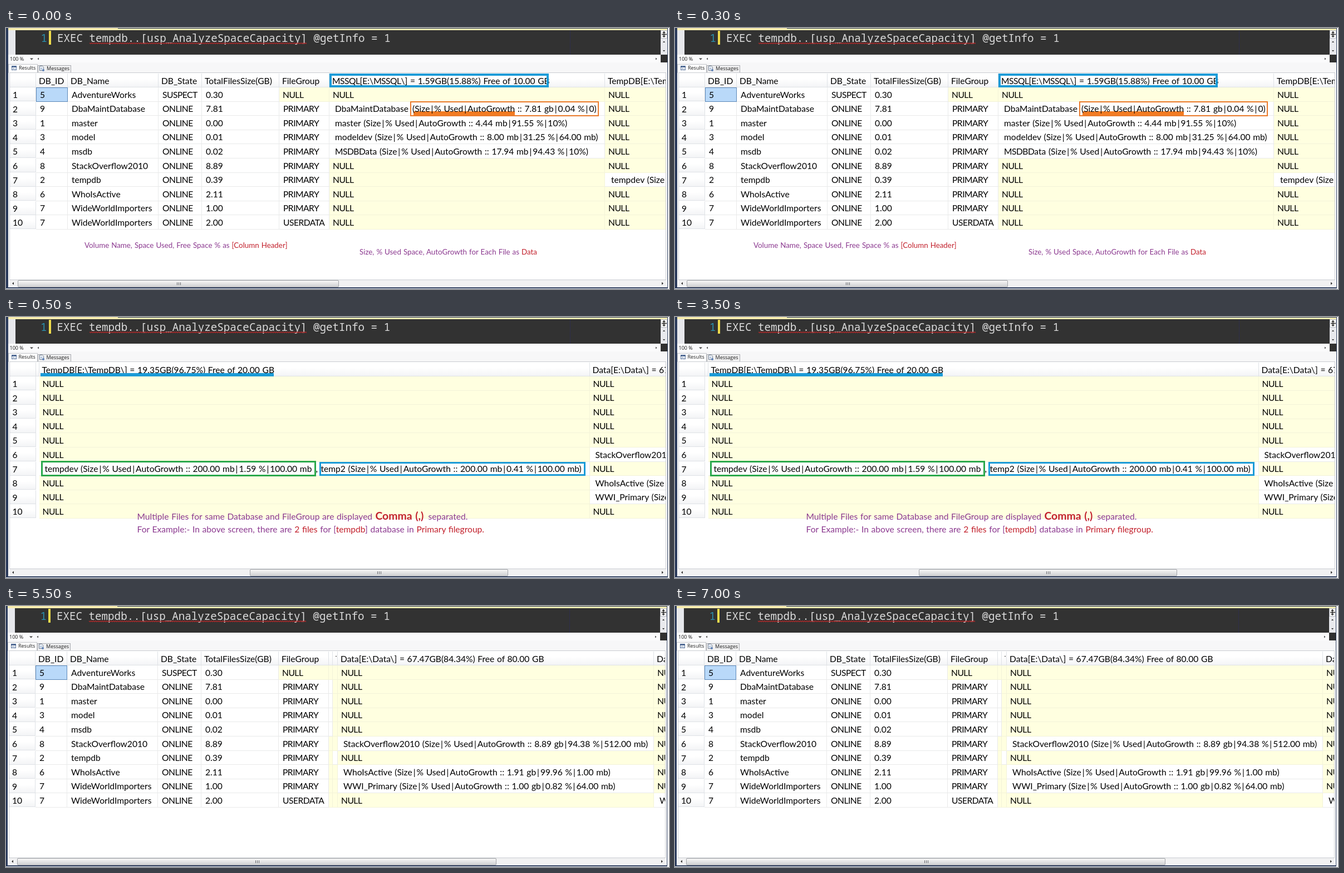
These frames come from a looping animation (1191x470 px, 8000 ms). An HTML page:

```html
<!DOCTYPE html>
<html lang="en">
<head>
<meta charset="utf-8">
<title>Space capacity results</title>
<style>
html, body { margin: 0; width: 100%; height: 100%; overflow: hidden; background: #fff; }
#stage { position: relative; width: 1191px; height: 470px; overflow: hidden; background: #fff; }
.scene { position: absolute; top: 0; width: 1191px; height: 470px; visibility: hidden; }
.grid { position: absolute; left: 0; top: 0; width: 1185px; height: 453px; overflow: hidden; }
.scene div, .scene span { position: absolute; box-sizing: border-box; }
.scene span { white-space: pre; line-height: 24px; color: #000; font: 15.6px/24px Lato, Roboto, sans-serif; word-spacing: .045em; }
.scene span b { font-weight: 400; color: #c2202c; }
.scene i { display: inline-block; width: .5em; text-align: center; font-style: normal; }
.scene u { text-decoration: none; letter-spacing: -.5px; }
.scene .ui { font: 9px/24px "Open Sans", "Noto Sans", sans-serif; color: #1c1c1c; word-spacing: 0; }
.scene .code { font: 19.2px/24px "Noto Sans Mono", "DejaVu Sans Mono", monospace; word-spacing: 0; color: #dcdcdc; }
.scene .code u { letter-spacing: 0; }
.cell { border: solid #e9eaea; border-width: 0 1px 1px 0; }
.null { background: #ffffe0; border-color: #f3f3d9; }
.head { background: linear-gradient(#fff 40%, #f3f4f6); border: solid #dfe2e6; border-width: 0 1px 1px 0; }
.scene .note { color: #8c3a90; }
.scene .small { font-size: 13.35px; }
svg { position: absolute; left: 0; top: 0; }
</style>
</head>
<body>
<div id="stage"></div>
<script>
const ROW_TOP = 107, ROW_H = 25.6, ROWS = 10;
const NAVY = '#2b3b5c', BLUE = '#1b9bd7', ORANGE = '#ea7a2b', GREEN = '#2ba84c';
const stage = document.getElementById('stage');

function add(parent, tag, cls, css, html = '') {
  const el = document.createElement(tag);
  el.className = cls;
  el.style.cssText = css;
  el.innerHTML = html;
  parent.appendChild(el);
  return el;
}
const box = (p, x, y, w, h, css = '', cls = '') =>
  add(p, 'div', cls, `left:${x}px;top:${y}px;width:${w}px;height:${h}px;${css}`);
const fill = (p, x, y, w, h, color) => box(p, x, y, w, h, `background:${color}`);
const frame = (p, x, y, w, h, line, color) => box(p, x, y, w, h, `border:${line}px solid ${color}`);
// Wide bars and tight capitals, as in the interface typeface.
const markup = str => str.replace(/\|/g, '<i>|</i>').replace(/[A-Z]{4,}/g, '<u>$&</u>');
// Text is placed by its left edge and the middle of its line.
const text = (p, x, mid, str, cls = '', css = '') =>
  add(p, 'span', cls, `left:${x}px;top:${mid - 12}px;${css}`, markup(str));
const rowMid = r => 119.5 + r * ROW_H;

function chrome(s, thumbX, thumbW) {
  fill(s, -1, 0, 1190, 469, NAVY);
  fill(s, 4, 0, 1184, 467, '#fff');
  fill(s, 201, 0, 988, 1, NAVY);
  fill(s, 4, 0, 197, 2, '#f6e9ae');
  fill(s, 4, 1, 1184, 3, '#f8edb0');

  // Editor
  fill(s, 4, 4, 13, 44, '#e7e8ec');
  fill(s, 17, 4, 1159, 44, '#323232');
  box(s, 1013, 5, 1, 43, 'border-left:1px dotted #2b2b62');
  fill(s, 77, 5, 4, 25, '#efdc4c');
  text(s, 62.5, 17.5, '1', 'code', 'color:#2b91af');
  text(s, 92, 17.5, 'EXEC tempdb..[usp_AnalyzeSpaceCapacity] @getInfo = 1', 'code');
  fill(s, 1176, 4, 12, 44, '#e9eaee');
  box(s, 1176, 4, 12, 15, 'background:#fafafa;border:1px solid #bbbec6');

  // Zoom strip
  fill(s, 4, 48, 1172, 14, '#fbfbfc');
  fill(s, 1176, 48, 12, 14, '#303030');
  text(s, 7, 56, '100 %', 'ui');

  // Tabs
  fill(s, 4, 62, 1184, 18, '#f7f7f8');
  box(s, 4, 65, 53, 16, 'background:#fff;border:1px solid #c3c5ca;border-bottom:0');
  box(s, 57, 67, 60, 13, 'background:#efeff0;border:1px solid #a9abb0;border-bottom:0');
  text(s, 23, 72, 'Results', 'ui');
  text(s, 73, 73, 'Messages', 'ui');

  // Panel edge and scroll bar
  box(s, 6, 80, 1180, 374, 'background:#fff;border:1px solid #c9ccd1');
  fill(s, 6, 454, 1180, 13, '#f1f1f2');
  box(s, thumbX, 454, thumbW, 13,
    'background:linear-gradient(#f7f7f7,#e3e3e4 50%,#cfd0d2);border:1px solid #a3a5a9;border-radius:2px');

  const grip = Math.round(thumbX + thumbW / 2);
  let zig = 'M150 27';
  for (let x = 152; x <= 541; x += 2) zig += `L${x} ${x % 4 ? 27 : 28.4}`;
  add(s, 'div', '', 'left:0;top:0', `<svg width="1191" height="470" fill="none">
    <path d="${zig}" stroke="#a82a2a" stroke-width="1.5"/>
    <path d="M1182 6v10M1178 11.5h9" stroke="#222" stroke-width="1.4"/>
    <path d="M1179 9l3-3 3 3zM1179 14l3 3 3-3zM1180 26l2-2.5 2 2.5zM1180 40l2 2.5 2-2.5z" fill="#333"/>
    <path d="M43 54.5h6l-3 3zM59 53.5v4l-2.5-2zM1167 53.5v4l2.5-2z" fill="#444"/>
    <path d="M14 457.5v5l-3-2.5zM1178 457.5v5l3-2.5z" fill="#333"/>
    <path d="M${grip - 3}.5 458v5m3-5v5m3-5v5" stroke="#66686c"/>
    <rect x="10.5" y="68.5" width="8" height="7" fill="#fff" stroke="#506a94"/>
    <path d="M10 70h9" stroke="#506a94" stroke-width="2"/><path d="M13.5 70v6M10 73.5h9" stroke="#a1b2cb"/>
    <path d="M60.5 68.5h5l2 2v6h-7z" fill="#fff" stroke="#68788f"/>
    <path d="M62 72h4M62 74h3" stroke="#7998c4"/><circle cx="67" cy="76" r="2" fill="#5b7fb4"/>
  </svg>`);
}

// One grid column: a value of 'NULL' tints its cell, '' leaves it white.
function column(g, x, w, title, values, inset = 6) {
  box(g, x, 82, w, 25, '', 'head');
  if (title) text(g, x + 5, 94.5, title);
  values.forEach((v, r) => {
    const top = Math.round(ROW_TOP + r * ROW_H);
    const h = Math.round(ROW_TOP + (r + 1) * ROW_H) - top;
    const isNull = v === 'NULL';
    box(g, x, top, w, h, '', isNull ? 'cell null' : 'cell');
    if (v && w > 12) text(g, x + (isNull ? 6 : inset), rowMid(r), v);
  });
}

function rowHeads(g) {
  box(g, 7, 82, 47, 25, '', 'head');
  for (let r = 0; r < ROWS; r++) {
    const top = Math.round(ROW_TOP + r * ROW_H);
    box(g, 7, top, 47, 25, '', 'head');
    text(g, 12, rowMid(r) + .5, String(r + 1));
  }
}

function mainColumns(g) {
  const list = s => s.split(' ');
  column(g, 54, 57, 'DB_ID', list('5 9 1 3 4 8 2 6 7 7'), 7);
  column(g, 111, 163, 'DB_Name', list('AdventureWorks DbaMaintDatabase master model msdb StackOverflow2010 tempdb WhoIsActive WideWorldImporters WideWorldImporters'), 7);
  column(g, 274, 78, 'DB_State', ['SUSPECT', ...Array(9).fill('ONLINE')], 7);
  column(g, 352, 139, 'TotalFilesSize(GB)', list('0.30 7.81 0.00 0.01 0.02 8.89 0.39 2.11 1.00 2.00'), 7);
  column(g, 491, 90, 'FileGroup', ['NULL', ...Array(8).fill('PRIMARY'), 'USERDATA'], 7);
  box(g, 54, 107, 57, 26, 'background:#b9d9f9;border:1px solid #5c88b8');
  text(g, 61, rowMid(0), '5');
}

// Ten NULLs with some rows replaced.
const sparse = over => Array.from({ length: ROWS }, (_, r) => r in over ? over[r] : 'NULL');
const info = (name, rest) => `${name} (Size|% Used|AutoGrowth :: ${rest}`;

function makeScene(dx, thumbX, thumbW) {
  const s = add(stage, 'div', 'scene', `left:${dx}px`);
  chrome(s, thumbX, thumbW);
  const g = add(s, 'div', 'grid', '');
  rowHeads(g);
  return { s, g };
}

const tempTitle = String.raw`TempDB[E:\TempDB\] = 19.35GB(96.75%) Free of 20.00 GB`;
const dataTitle = String.raw`Data[E:\Data\] = 67.47GB(84.34%) Free of 80.00 GB`;
const dataValues = sparse({
  5: info('StackOverflow2010', '8.89 gb|94.38 %|512.00 mb)'),
  7: info('WhoIsActive', '1.91 gb|99.96 %|1.00 mb)'),
  8: info('WWI_Primary', '1.00 gb|0.82 %|64.00 mb)')
});
const tempInfo = info('tempdev', '200.00 mb|1.59 %|100.00 mb');

function firstScene() {
  const { s, g } = makeScene(0, 21, 577);
  mainColumns(g);
  column(g, 581, 495, String.raw`MSSQL[E:\MSSQL\] = 1.59GB(15.88%) Free of 10.00 GB`, sparse({
    1: 'DbaMaintDatabase',
    2: info('master', '4.44 mb|91.55 %|10%)'),
    3: info('modeldev', '8.00 mb|31.25 %|64.00 mb)'),
    4: info('MSDBData', '17.94 mb|94.43 %|10%)')
  }), 10);
  column(g, 1076, 500, tempTitle, sparse({ 6: tempInfo }), 11);
  fill(s, 732, 150, 182, 9, '#f27b22');
  text(s, 730, rowMid(1), info('', '7.81 gb|0.04 %|0)').trim());
  frame(s, 726, 132, 339, 27, 2, ORANGE);
  frame(s, 581, 82, 394, 25, 4, BLUE);
  text(s, 141, 391, 'Volume Name, Space Used, Free Space % as <b>[Column Header]</b>', 'note small');
  text(s, 635, 402.5, 'Size, % Used Space, AutoGrowth for Each File as <b>Data</b>', 'note small');
  return s;
}

function secondScene() {
  const { s, g } = makeScene(-.5, 438, 464);
  box(g, 54, 82, 6, 25, '', 'head');
  column(g, 60, 989, tempTitle, sparse({ 6: tempInfo }), 10);
  column(g, 1049, 700, dataTitle, dataValues, 10);
  text(g, 557, rowMid(6), ',');
  text(g, 566, rowMid(6), info('temp2', '200.00 mb|0.41 %|100.00 mb)'));
  fill(s, 62, 101, 419, 6, BLUE);
  frame(s, 63, 259, 494, 28, 3, GREEN);
  frame(s, 563, 261, 478, 25, 3, BLUE);
  text(s, 236, 358.5, 'Multiple Files for same Database and FileGroup are displayed', 'note');
  text(s, 664, 357.5, 'Comma (,)', '', 'color:#c2202c;font-size:19.4px;font-weight:700');
  text(s, 759, 358.5, 'separated.', 'note');
  text(s, 236, 381.5, 'For Example:- In above screen, there are <b>2 files</b> for [<b>tempdb</b>] database in <b>Primary filegroup.</b>', 'note');
  return s;
}

function thirdScene() {
  const { s, g } = makeScene(-1, 21, 861);
  mainColumns(g);
  column(g, 581, 7, '', sparse({ 1: '', 2: '', 3: '', 4: '' }));
  column(g, 588, 9, '', sparse({ 6: '' }));
  fill(g, 593, 90, 2, 1, '#333');
  column(g, 597, 568, dataTitle, dataValues, 10);
  column(g, 1165, 300, 'Data', sparse({ 9: 'WWI_UserData' }), 10);
  return s;
}

const scenes = [firstScene(), secondScene(), thirdScene()];
const start = performance.now();

function tick(now) {
  const t = Math.max(0, now - start) % 8000;
  const shown = t < 500 ? 0 : t < 5500 ? 1 : 2;
  scenes.forEach((s, i) => { s.style.visibility = i === shown ? 'visible' : 'hidden'; });
  requestAnimationFrame(tick);
}
tick(start);
</script>
</body>
</html>
```
